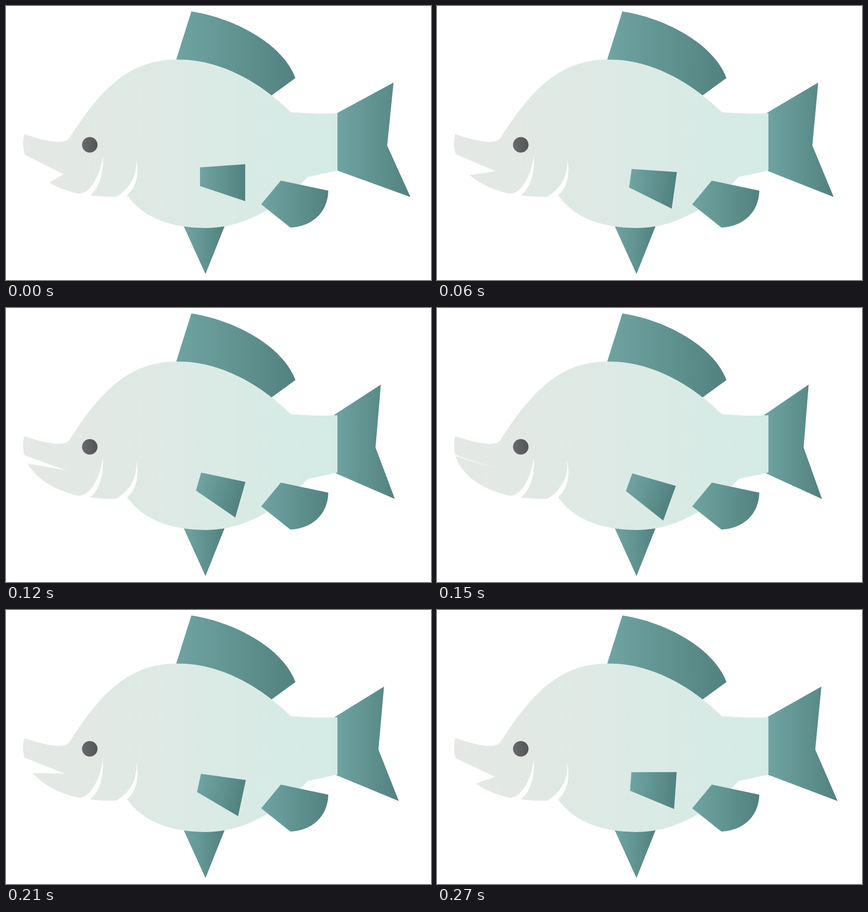
Animation of 931x601 px, one loop 0.3 s. Source, as an HTML page with a canvas:

```html
<!DOCTYPE html>
<html lang="en">
<head>
<meta charset="utf-8">
<title>Swimming fish</title>
<style>
  html, body { margin: 0; width: 100%; height: 100%; overflow: hidden; background: #fff; }
  canvas { display: block; }
</style>
</head>
<body>
<canvas id="stage" width="931" height="601"></canvas>
<script>
const ctx = document.getElementById('stage').getContext('2d');
const STEP = 30, STEPS = 10;

const TEAL = ['#6fa4a2', '#52827f'];
const SKIN = ['#e5e8e4', '#d4ebe5'];
const EYE = ['#6a6a6c', '#545456'];

const body = new Path2D(`M40 281 C70 291 96 298 116 298 Q132 298 138 291
  C198 198 260 118 372 117.5 C465 115 555 165 624 233
  Q690 238 726 235 V361 L661 375 C607 432 530 487 437 487
  C358 486 300 464 265 415 L241 418.5 Q205 419 183 415 L160 412
  C88 396 51 359 41 326 Q34 303 40 281 Z`);
const gills = new Path2D(`M160 412 C184 411 206 375 212 328
  C215 368 203 402 183 416 L172 422 Z
  M241 418.5 C270 402 289 372 285 335 C293 370 284 400 265 415 L253 428 Z`);
const dorsal = new Path2D('M406 12 C490 24 604 78 634 158 L582 196 L520 240 L373 117 Z');
const ventral = new Path2D('M388 480 H480 L437 588 Z');
const anal = new Path2D('M602 383 L706 405 C705 455 668 484 623 486 L559 435 Z');
const pectoral = new Path2D('M425 354 L524 347 V428 L425 395 Z');
const tail = new Path2D('M726 234.5 L849 168 L835 306 L886 419 L726 361 Z');
const eye = new Path2D('M166.5 304.5 a17 17 0 1 1 34 0 a17 17 0 1 1 -34 0 Z');

function paint(path, [from, to], left, right) {
  const gradient = ctx.createLinearGradient(left, 0, right, 0);
  gradient.addColorStop(0, from);
  gradient.addColorStop(1, to);
  ctx.fillStyle = gradient;
  ctx.fill(path);
}

function paintMoved(transform, ...shape) {
  ctx.save();
  transform();
  paint(...shape);
  ctx.restore();
}

// The open mouth is a wedge whose lower edge swings up to meet the snout.
function cutMouth(p) {
  ctx.beginPath();
  ctx.moveTo(126 + 1.1 * p, 369 - 3.25 * p);
  ctx.lineTo(30, 320.5 - 0.3 * p);
  ctx.lineTo(30, 425 - 25.9 * p + 1.03 * p * p);
  ctx.fill();
}

function draw(p) {
  ctx.fillStyle = '#fff';
  ctx.fillRect(0, 0, 931, 601);

  paintMoved(() => {
    ctx.translate(682, 0);
    ctx.scale(1 - 0.0417 * p, 1);
    ctx.translate(-682, 0);
  }, tail, TEAL, 726, 886);
  paint(dorsal, TEAL, 373, 634);
  paint(ventral, TEAL, 390, 479);
  paint(body, SKIN, 38, 726);

  ctx.fillStyle = '#fff';
  ctx.fill(gills);
  cutMouth(p);

  paint(eye, EYE, 166, 201);
  paint(anal, TEAL, 559, 706);
  paintMoved(() => {
    ctx.translate(401.3, 366.4);
    ctx.rotate(4 * p * Math.PI / 180);
    ctx.translate(-401.3, -366.4);
  }, pectoral, TEAL, 425, 524);
}

function tick(now) {
  const step = Math.floor(now / STEP) % STEPS;
  draw(Math.min(step, STEPS - step));
  requestAnimationFrame(tick);
}

draw(0);
requestAnimationFrame(tick);
</script>
</body>
</html>
```
